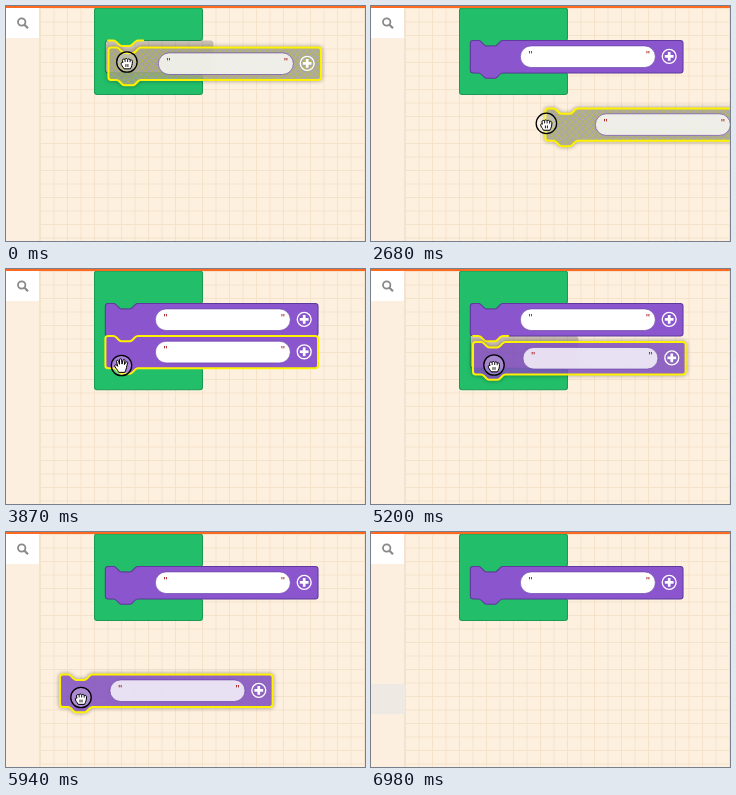
These frames come from a looping animation (359 px wide and 235 px high, 8910 ms). An HTML page:

```html
<!DOCTYPE html>
<html lang="en">
<head>
<meta charset="utf-8">
<title>Dragging blocks</title>
<style>
  html, body { margin: 0; width: 100%; height: 100%; overflow: hidden; background: #fdf0df; }
  svg { display: block; width: 100%; height: 100%; }
  .block path { fill: #8a55cd; stroke: #5f3a9c; stroke-width: 1.5; }
  .block rect { fill: #fff; stroke: #6c45a8; stroke-width: 1; }
  .block text { font: 16px "Liberation Sans", Arial, sans-serif; fill: #a31515; text-anchor: middle; }
  .block .plus { fill: none; stroke: #fff; }
  .block.selected path { stroke: #fff200; stroke-width: 3; }
  .block.drag { filter: drop-shadow(0 0 3.5px rgba(0, 0, 0, .4)); }
  .block.drag path, .block.drag rect { fill-opacity: .8; }
  .block.loose path { fill: url(#loose); }
</style>
</head>
<body>
<svg viewBox="0 0 359 235" preserveAspectRatio="none">
  <defs>
    <pattern id="grid" x="34" y="2" width="13.5" height="13.5" patternUnits="userSpaceOnUse">
      <path d="M.5 0V13.5M0 .5H13.5" stroke="#f4e2cb" fill="none"/>
    </pattern>
    <pattern id="loose" width="10" height="10" patternUnits="userSpaceOnUse">
      <path d="M0 0H10V10H0z" style="fill:#aaa;stroke:none"/>
      <path d="M0 0L10 10M10 0L0 10" style="fill:none;stroke:#cc0;stroke-width:1"/>
    </pattern>
  </defs>
  <rect width="359" height="235" fill="#fdf0df"/>
  <rect x="34" width="325" height="235" fill="url(#grid)"/>
  <path id="loop" fill="#23be6a" stroke="#1a9a53" stroke-width="1.5"/>
  <path id="marker" fill-opacity=".2"/>
  <g id="first" class="block"></g>
  <path id="snap" fill="none" stroke="#fff200" stroke-width="3" stroke-linecap="round"/>
  <rect id="toolbox" width="33" height="235"/>
  <path d="M33.5 2V235" stroke="#f1e3d0"/>
  <rect id="row" y="152" width="34" height="30" fill="#eeeae3"/>
  <rect y="2" width="33" height="30" fill="#fff"/>
  <g fill="none" stroke="#8a8a8a" stroke-width="1.8">
    <circle cx="15.7" cy="16" r="3.7"/>
    <path d="M18.5 18.8L22 22.3" stroke-width="2.2"/>
  </g>
  <g id="second" class="block"></g>
  <rect width="359" height="2" fill="#ff6a20"/>
  <g id="cursor" stroke="#000" stroke-linejoin="round" stroke-linecap="round">
    <circle r="10.2" fill="#fff" fill-opacity=".25" stroke-width="1.3"/>
    <path id="open" fill="#fff" stroke-width="1" d="M-3 6.5C-4 4-7 1.500-6.800 0C-6.500-1.200-5-.8-3.800.8L-5-4C-5.200-5.600-3.500-5.800-3-4.300L-2-1.200L-2-5.600C-2-7.200 0-7.200 .1-5.600L.5-1.400L1.600-5.300C2-6.700 3.600-6.300 3.400-4.800L2.900-.9L4.500-3.300C5.300-4.300 6.600-3.600 6.100-2.400C5 .5 5 4 3.500 6.500z"/>
    <g id="fist">
      <path fill="#fff" stroke-width="1" d="M-3 6.500C-4 4.500-6 3-5.700 1.200C-5.500 .3-4.500 .3-4 .8L-4.500-1.500C-4.500-3.200-2.700-3.300-2-2.500C-1.700-3.800 .2-3.800 .7-2.600C1.300-3.500 3-3.200 3.200-2C4.300-2.600 5.600-1.800 5.500-.5C5.500 2.500 4.800 4.500 3.700 6.500z"/>
      <path fill="none" stroke-width=".9" d="M-1.800-2.200V-.4M.7-2.200V-.4M3.200-1.700V-.2M-1 2.500V4.500M1 2.500V4.500"/>
    </g>
  </g>
</svg>
<script>
const LOOP = 8910, TICK = 148.5, LAST = 59, SCALE = .675;
const $ = id => document.getElementById(id);

const notch = d => {
  const p = (...v) => v.map((n, i) => i % 2 ? n : n * d).join(" ");
  return `c${p(2, 0, 3, 1, 4, 2)}l${p(4, 4)}c${p(1, 1, 2, 2, 4, 2)}h${12 * d}` +
         `c${p(2, 0, 3, -1, 4, -2)}l${p(4, -4)}c${p(1, -1, 2, -2, 4, -2)}`;
};
const arc = (x, y, sweep = 1) => `a4 4 0 0 ${sweep} ${x} ${y}`;

const blockPath = w =>
  `M0 4${arc(4, -4)}h8${notch(1)}H${w - 4}${arc(4, 4)}V44${arc(-4, 4)}H48${notch(-1)}H4${arc(-4, -4)}z`;

const loopPath = mouth => {
  const y = 48 + mouth;
  return `M0 4${arc(4, -4)}H156${arc(4, 4)}V44${arc(-4, 4)}H64${notch(-1)}H20${arc(-4, 4, 0)}` +
         `V${y - 4}${arc(4, 4, 0)}H156${arc(4, 4)}V${y + 28}${arc(-4, 4)}H4${arc(-4, -4)}z`;
};

const place = (el, [x, y], scale = SCALE) =>
  el.setAttribute("transform", `translate(${x} ${y}) scale(${scale})`);
const show = (el, on) => el.style.display = on ? "" : "none";

// Position along [tick, x, y] keys
function along(keys, n) {
  let i = 0;
  while (i < keys.length - 2 && n >= keys[i + 1][0]) i++;
  const [a, ax, ay] = keys[i], [b, bx, by] = keys[i + 1];
  const k = Math.min(1, Math.max(0, (n - a) / (b - a)));
  return [ax + (bx - ax) * k, ay + (by - ay) * k];
}

const SLOT1 = [99.4, 34.5], SLOT2 = [99.4, 66.9];
const DRAG1 = [[0, 102.4, 41.5], [1, 101, 38.5]];
const DRAG2 = [[16, 285, 96], [18, 174.4, 102.4], [19, 94, 88], [20, 101, 73]];
const DRAG3 = [[35, 102, 73], [38, 117, 122.4], [39, 108, 133], [41, 0, 152],
               [42, -48, 158], [43, -70.5, 162.4], [44, -72, 163]];
const RELEASE = [[25, 102, 88], [26, 115.500, 96.500], [27, 120, 110], [30, 123.500, 85.500]];

for (const id of ["first", "second"]) $(id).innerHTML =
  `<path d="${blockPath(315)}"/><rect x="74" y="8" width="200" height="32" rx="16"/>
   <text x="89" y="27">"</text><text x="263" y="27">"</text>
   <g class="plus"><circle cx="294.500" cy="23.500" r="10.300" stroke-width="2"/>
   <line x1="288" x2="301" y1="23.500" y2="23.500" stroke-width="4"/>
   <line x1="294.500" x2="294.500" y1="17" y2="30" stroke-width="4"/></g>`;
$("marker").setAttribute("d", blockPath(160));
$("snap").setAttribute("d", `M4 0h8${notch(1)}h8`);
place($("loop"), [88.5, 2]);

function setBlock(el, pos, { drag = false, loose = false, selected = false }) {
  show(el, pos);
  if (!pos) return;
  place(el, pos);
  el.classList.toggle("drag", drag);
  el.classList.toggle("loose", loose);
  el.classList.toggle("selected", selected || drag);
}

function cursorAt(n, pos1, pos2) {
  const from = ([x, y], dx, dy) => [x + dx, y + dy];
  if (n < 2) return from(pos1, 18.500, 14.500);
  if (n < 4) return [120.500, 55];
  if (n < 5) return [120.500, 201];
  if (n < 16) return null;
  if (n < 21) return from(pos2, 1, 15);
  if (n < 35) return along(RELEASE, n);
  return pos2 && from(pos2, 21, 23);
}

function draw(ms) {
  const n = Math.min(LAST, Math.floor((ms % LOOP + 15) / TICK));
  const within = (a, b) => n >= a && n < b;
  const drag1 = n < 2, drag2 = within(16, 21), drag3 = within(35, 45);
  const pos1 = drag1 ? along(DRAG1, n) : SLOT1;
  const pos2 = drag2 ? along(DRAG2, n) : drag3 ? along(DRAG3, n) : within(21, 35) ? SLOT2 : null;
  const preview2 = within(19, 21) || within(35, 40);

  setBlock($("first"), pos1, { drag: drag1, loose: drag1, selected: n < 10 });
  setBlock($("second"), pos2, { drag: drag2 || drag3, loose: drag2, selected: true });
  $("loop").setAttribute("d", loopPath(within(19, 40) ? 96 : 48));
  for (const id of ["marker", "snap"]) {
    show($(id), drag1 || preview2);
    place($(id), drag1 ? SLOT1 : SLOT2);
  }

  $("toolbox").setAttribute("fill", within(41, 46) ? "#ec655c" : "#fcefdf");
  show($("row"), n >= 47);

  const cursor = cursorAt(n, pos1, pos2);
  const open = within(2, 5) || within(26, 32);
  show($("cursor"), cursor);
  if (cursor) place($("cursor"), cursor, n === 32 ? .92 : 1);
  show($("open"), open);
  show($("fist"), !open);
}

const start = performance.now();
function tick() {
  draw(performance.now() - start);
  requestAnimationFrame(tick);
}
tick();
</script>
</body>
</html>
```
